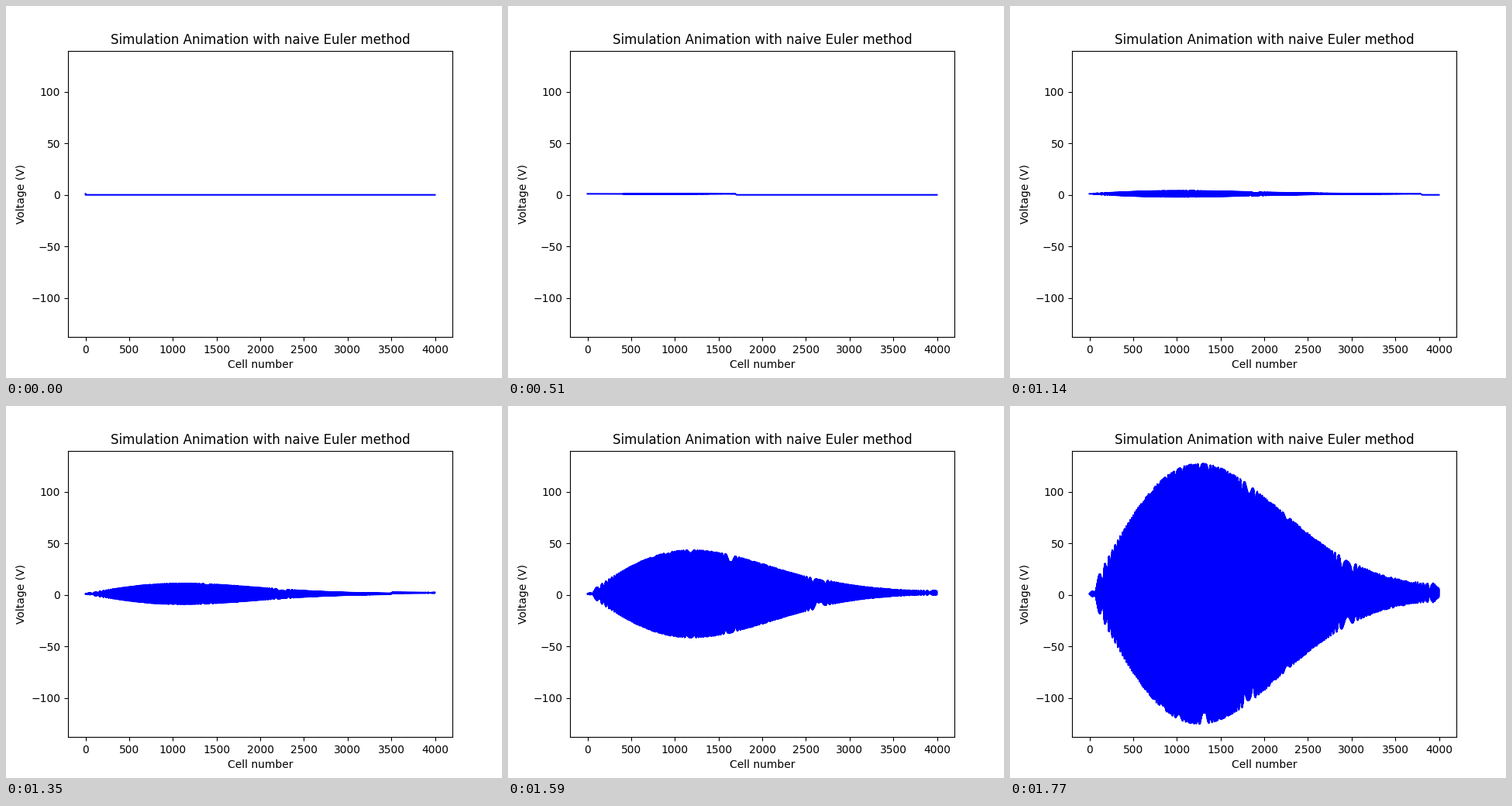
A matplotlib script that plays this animation: 640x480 px, repeating every 1800 ms.

```python
import numpy as np
import matplotlib.pyplot as plt
from matplotlib.animation import FuncAnimation

CELLS = 4000       # nodes of the LC ladder, node 0 held at 1 V, far end open
DT = 1e-3          # Euler time step, in units of sqrt(LC)
STEPS = 100_000    # Euler steps per frame
FRAMES = 60
INTERVAL = 30

# Eigenmodes of the ladder: sin(k n) with frequency 2 sin(k / 2)
P = 2 * CELLS - 1
odd = 2 * np.arange(CELLS - 1) + 1
k = odd * np.pi / P
omega = 2 * np.sin(k / 2)
weight = 2 / (P * np.tan(k / 2))

# One explicit Euler step multiplies each mode by 1 + i omega dt
log_gain = 0.5 * np.log1p((omega * DT) ** 2)
angle = np.arctan(omega * DT)


def voltage(frame):
    """Node voltages after frame * STEPS explicit Euler steps."""
    n = frame * STEPS
    modes = np.zeros(2 * P)
    modes[odd] = weight * np.exp(n * log_gain) * np.cos(n * angle)
    return 1 - 2 * P * np.fft.ifft(modes).imag[:CELLS]


fig, ax = plt.subplots(figsize=(6.4, 4.8), dpi=100)
# The last state is the largest, so it sets the axis limits
line, = ax.plot(np.arange(CELLS), voltage(FRAMES - 1), color="blue")
ax.set_xlim(ax.get_xlim())
ax.set_ylim(ax.get_ylim())
ax.set_title("Simulation Animation with naive Euler method")
ax.set_xlabel("Cell number")
ax.set_ylabel("Voltage (V)")


def update(frame):
    line.set_ydata(voltage(frame))
    return line,


anim = FuncAnimation(fig, update, frames=FRAMES, interval=INTERVAL,
                     repeat=True, repeat_delay=0)
plt.show()
```
